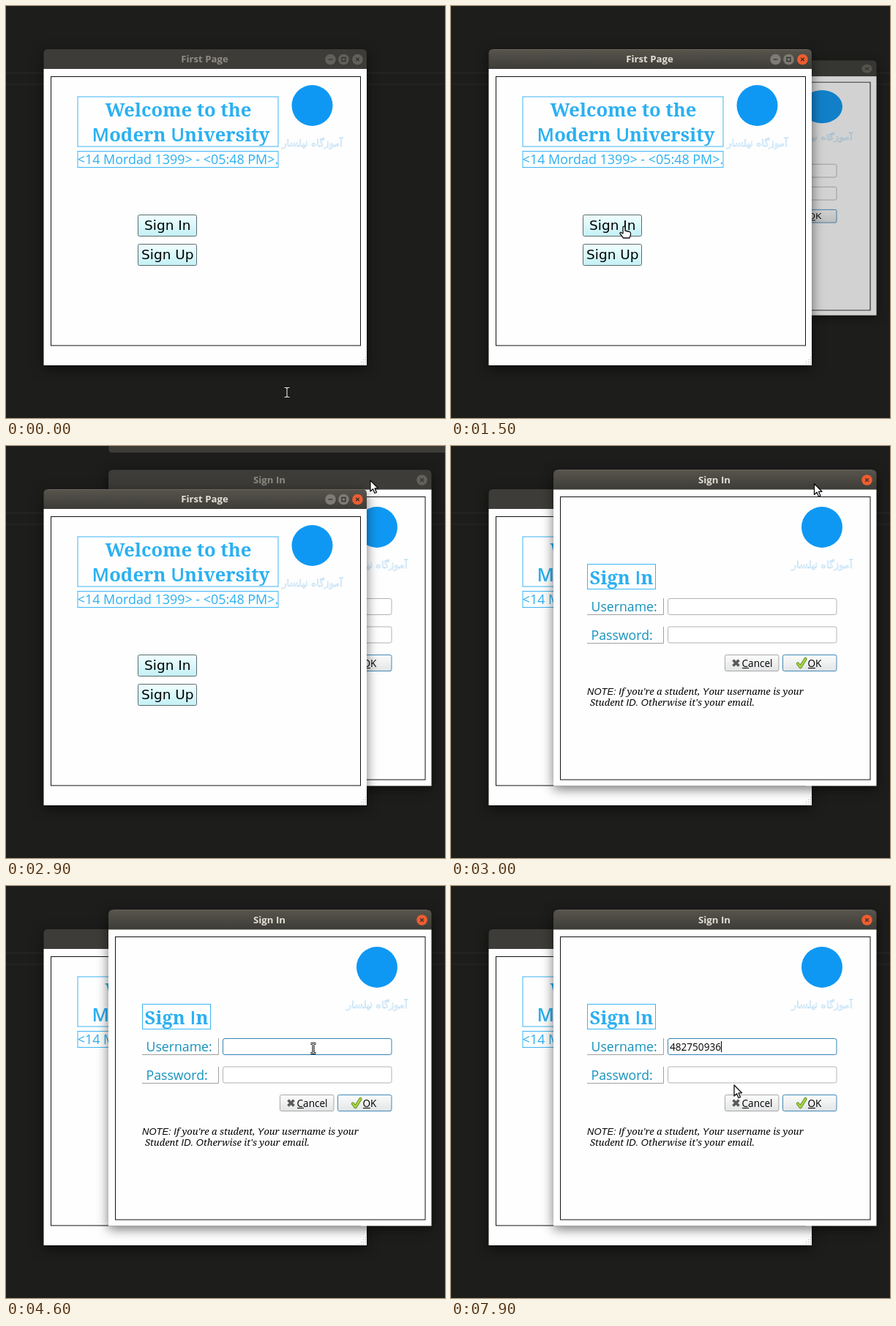
An HTML page that plays this animation: 600 px wide and 563 px high, repeating every 8 s.

```html
<!DOCTYPE html>
<html lang="en">
<head>
<meta charset="utf-8">
<title>Sign in demo</title>
<style>
  html, body { margin: 0; width: 100%; height: 100%; overflow: hidden; background: #1d1d1c; }
  svg { display: block; width: 600px; height: 563px; }
  text { white-space: pre; }
  .ui { font-family: "Open Sans", "Noto Sans", sans-serif; font-size: 13.6px; }
  .title { font: 700 13.2px "Open Sans", "Noto Sans", sans-serif; text-anchor: middle; }
  .head { font: 700 25.6px "Noto Serif", serif; fill: #2bb0f2; text-anchor: middle; }
  .head tspan { font: 600 25.5px "Open Sans", "Noto Sans", sans-serif; }
  .date { font: 17.9px "Open Sans", "Noto Sans", sans-serif; fill: #2bb0f2; text-anchor: middle; }
  .label { font: 17.7px "Open Sans", "Noto Sans", sans-serif; fill: #1592bd; }
  .big { font: 18.5px "DejaVu Sans", sans-serif; text-anchor: middle; }
  .note { font: italic 13px "Noto Serif", serif; }
  .note tspan { font: italic 13px "Liberation Sans", sans-serif; }
  .mark { font: 13.8px "DejaVu Sans", sans-serif; fill: none; stroke: #a5d2f2; stroke-width: .5; text-anchor: middle; direction: rtl; }
  .box { fill: none; stroke: #3db6f3; }
  .frame { fill: none; stroke: #111; }
  .win { filter: drop-shadow(0 4px 8px rgba(0, 0, 0, .55)); }
</style>
</head>
<body>
<svg id="stage" viewBox="0 0 600 563" xmlns="http://www.w3.org/2000/svg"></svg>
<script>
const LOOP = 8000, STEP = 100;
const OPEN = 1360, OPEN_TIME = 250, FOCUS_FIRST = 1200, RAISE = 3000, FOCUS_FIELD = 4200;
const USER = '482750936';
const KEY_TIMES = [5100, 5700, 5900, 6100, 6300, 6500, 6900, 7100, 7300];
const DIGIT = 7.79;

// Pointer hot spot: time, x, y
const PATH = [
  [0, 384, 528], [200, 395, 470], [300, 433, 330], [400, 420, 200], [500, 330, 142],
  [600, 230, 128], [700, 150, 150], [800, 127, 210], [900, 150, 270], [1000, 195, 297],
  [1200, 230, 301], [1500, 236, 302], [1800, 236, 303], [1900, 236, 320], [2000, 250, 290],
  [2100, 266.5, 245.5], [2300, 310, 180], [2500, 410, 100], [2700, 520, 50], [2900, 498, 47],
  [3100, 495, 56], [3500, 418, 203], [3700, 360, 240], [3800, 269, 246], [3900, 300, 238],
  [4100, 400, 224], [4200, 420, 222], [7500, 420, 222], [7700, 404, 252], [7800, 384, 283],
  [7900, 387, 272]
];

const rect = (x, y, w, h, attrs) => `<rect x="${x}" y="${y}" width="${w}" height="${h}" ${attrs}/>`;
const text = (x, y, cls, s, attrs = '') => `<text x="${x}" y="${y}" class="${cls}" ${attrs}>${s}</text>`;
const gradient = (id, from, to) =>
  `<linearGradient id="${id}" x2="0" y2="1"><stop stop-color="${from}"/><stop offset="1" stop-color="${to}"/></linearGradient>`;

const GLYPHS = { min: 'M-3 0H3', max: 'M-2.5 -2.5H2.5V2.5H-2.5Z', close: 'M-2.3 -2.3L2.3 2.3M2.3 -2.3L-2.3 2.3' };

function titleButton(x, y, kind, active) {
  const fill = !active ? '#62605a' : kind === 'close' ? '#ee5d31' : '#7d7b73';
  return `<g transform="translate(${x} ${y})"><circle r="7.3" fill="${fill}"/>
    <path d="${GLYPHS[kind]}" fill="none" stroke="#33322e" stroke-width="1.3"/></g>`;
}

function titleBar(x, y, name, buttons, active) {
  const shape = `M${x} ${y + 27}V${y + 6}q0 -6 6 -6h429.5q6 0 6 6v21Z`;
  return `<path d="${shape}" fill="${active ? 'url(#barOn)' : '#3d3c38'}"/>
    ${active ? `<path d="M${x + 6} ${y + .5}h429" stroke="#68665d"/>` : ''}
    ${text(x + 220, y + 18, 'title', name, `fill="${active ? '#e2dfd5' : '#8e8b83'}"`)}
    ${buttons.map(([dx, kind]) => titleButton(x + dx, y + 14, kind, active)).join('')}`;
}

function windowShell(id, x, y, name, buttons, body) {
  return `<g id="${id}" class="win">
    <g class="off">${titleBar(x, y, name, buttons, false)}</g>
    <g class="on">${titleBar(x, y, name, buttons, true)}</g>
    ${rect(x, y + 27, 441.5, 405, 'fill="#fefefe"')}${body}</g>`;
}

const emblem = (x, y) =>
  `<circle cx="${x}" cy="${y}" r="28" fill="#0f98f3"/>${text(x, y + 56, 'mark', 'آموزگاه نیلسار')}`;

function grip(x, y) {
  let dots = '';
  for (let r = 0; r < 4; r++)
    for (let c = 0; c <= r; c++) dots += rect(x - c * 3, y - (3 - r) * 3, 1, 1, 'fill="#aaa"');
  return dots;
}

const bigButton = (y, name) =>
  rect(180.5, y, 80, 29, 'rx="2" fill="url(#cyan)" stroke="#5c6b6d"') + text(220.8, y + 20.5, 'big', name);

const label = (y, name) =>
  `<path d="M186 ${y + 22.5}H290.5V${y}" fill="none" stroke="#a0a0a0"/>` + text(191.5, y + 18, 'label', name);

const field = (y, id) =>
  rect(296.5, y, 230.5, 22, `id="${id}" rx="2.5" fill="#fff" stroke="#b2b2b2"`);

const dialogButton = (x, edge, tx, name) =>
  rect(x, 285.5, 73.5, 22, `rx="2" fill="url(#grey)" stroke="${edge}"`) + text(tx, 301.5, 'ui', name);

const firstBody = `
  ${rect(61.5, 96.5, 423, 367.5, 'class="frame"')}
  ${rect(98, 124, 274, 68, 'class="box"')}
  ${rect(98, 198.5, 274, 22, 'class="box"')}
  ${text(235.5, 151, 'head', 'Welcome to the')}
  ${text(239, 185, 'head', '<tspan>M</tspan>odern <tspan>U</tspan>niversity')}
  ${text(235, 216, 'date', '&lt;14 Mordad 1399&gt; - &lt;05:48 PM&gt;.')}
  ${emblem(418.5, 136)}
  ${bigButton(285.5, 'Sign In')}${bigButton(325.5, 'Sign Up')}
  ${grip(491, 489)}`;

const signBody = `
  ${rect(149.5, 69.5, 423.5, 386.5, 'class="frame"')}
  ${emblem(507, 111)}
  ${rect(186.5, 161.5, 93, 34, 'class="box"')}
  ${text(233, 188.5, 'head', 'Sign <tspan>I</tspan>n')}
  ${label(208, 'Username:')}${label(247, 'Password:')}
  ${field(208.5, 'userField')}${field(247, 'passField')}
  ${text(299, 224.5, 'ui', '', 'id="user"')}
  <path id="caret" d="M0 212V227" stroke="#000"/>
  ${dialogButton(374.5, '#a8a8a8', 397.5, 'Cancel')}
  ${dialogButton(453.5, '#4089b8', 487.5, 'OK')}
  <path d="M398 303.5h9M488 303.5h10" stroke="#000"/>
  <path d="M385.5 292.5l8 8m0 -8l-8 8" stroke="#5b5a56" stroke-width="3.6"/>
  <g fill="none" stroke-linejoin="round" stroke-linecap="round">
    <path d="M474 297.5l3.5 4.5 7 -11" stroke="#5d8a1d" stroke-width="4.2"/>
    <path d="M474 297.5l3.5 4.5 7 -11" stroke="#a8d641" stroke-width="2.5"/>
  </g>
  ${text(186, 339.5, 'note', '<tspan>NOTE: I</tspan>f you\'re a student, <tspan>Y</tspan>our username is your')}
  ${text(190, 355, 'note', 'Student <tspan>ID. O</tspan>therwise it\'s your email.')}`;

const beam = 'M-3.5 -6.5H-1L0 -5.5 1 -6.5H3.5M0 -5.5V5.5M-3.5 6.5H-1L0 5.5 1 6.5H3.5';
const pointers = `
  <path id="arrow" d="M0 0V15L3.5 11.8 6 17.5 8.5 16.4 6 10.8H10.5Z" fill="#fff" stroke="#111" stroke-width="1.3" stroke-linejoin="round"/>
  <g id="beam" fill="none"><path d="${beam}" stroke="#111" stroke-width="3.2"/><path d="${beam}" stroke="#f4f4f4" stroke-width="1.1"/></g>
  <path id="hand" d="M-1 0q1.5 -1.5 3 0V5l6 1.5q1.5 .5 1.5 2V11l-1.5 4H-.5L-5 9q-.5 -2 1.5 -1.5L-1 9Z" fill="#fff" stroke="#111" stroke-width="1.3" stroke-linejoin="round"/>`;

const stage = document.getElementById('stage');
stage.innerHTML = `
  <defs>${gradient('barOn', '#57554c', '#3d3c37')}${gradient('cyan', '#f0ffff', '#c3f0f5')}${gradient('grey', '#fcfcfc', '#e2e4e5')}</defs>
  ${rect(0, 0, 600, 563, 'fill="#1d1d1c"')}
  <path d="M0 91.5H600M0 107H600" stroke="#2a2a29"/>
  ${rect(140.5, -20, 480, 29, 'id="notice" rx="4" fill="#3d3c37"')}
  <g id="desk">
    ${windowShell('sign', 140, 32.5, 'Sign In', [[428.5, 'close']], signBody)}
    ${windowShell('first', 51.5, 59, 'First Page', [[392, 'min'], [410, 'max'], [429, 'close']], firstBody)}
  </g>
  <g id="pointer">${pointers}</g>`;

const el = {};
stage.querySelectorAll('[id]').forEach(n => el[n.id] = n);

const show = (node, on) => node.setAttribute('visibility', on ? 'visible' : 'hidden');

function setActive(win, on) {
  win.querySelector('.on').style.display = on ? '' : 'none';
  win.querySelector('.off').style.display = on ? 'none' : '';
}

function pointerAt(t) {
  const i = PATH.findIndex(p => p[0] > t);
  if (i < 0) return PATH[PATH.length - 1].slice(1);
  const [t0, x0, y0] = PATH[i - 1], [t1, x1, y1] = PATH[i];
  const k = (t - t0) / (t1 - t0);
  return [x0 + (x1 - x0) * k, y0 + (y1 - y0) * k];
}

function pointerKind(t, x, y) {
  const inside = (l, top, r, b) => x >= l && x <= r && y >= top && y <= b;
  if (t < RAISE) {
    if (inside(180, 285, 262, 315) || inside(180, 325, 262, 355)) return 'hand';
    return y > 491 ? 'beam' : 'arrow';
  }
  return inside(296, 208, 528, 231) || inside(296, 247, 528, 270) ? 'beam' : 'arrow';
}

function draw(time) {
  const t = Math.floor(time / STEP) * STEP;
  const raised = t >= RAISE;
  const top = raised ? el.sign : el.first;
  if (el.desk.lastElementChild !== top) el.desk.appendChild(top);

  setActive(el.first, t >= FOCUS_FIRST && !raised);
  setActive(el.sign, raised);
  show(el.notice, t >= 1800 && !raised);

  // The dialog unfolds vertically about its middle
  const p = Math.min(1, Math.max(0, (t - OPEN) / OPEN_TIME));
  const grow = 1 - (1 - p) ** 2;
  el.sign.style.display = grow > 0 ? '' : 'none';
  el.sign.style.opacity = grow;
  el.sign.setAttribute('transform', `translate(0 ${248.5 * (1 - grow)}) scale(1 ${grow})`);

  const focused = t >= FOCUS_FIELD;
  const typed = KEY_TIMES.filter(k => k <= t).length;
  el.userField.setAttribute('stroke', focused ? '#3584b5' : '#b2b2b2');
  el.user.textContent = USER.slice(0, typed);
  el.caret.setAttribute('transform', `translate(${Math.round(299 + typed * DIGIT) + .5} 0)`);
  el.caret.style.display = focused && (t < 4600 || t >= KEY_TIMES[0]) ? '' : 'none';

  const [x, y] = pointerAt(t);
  const kind = pointerKind(t, x, y);
  el.pointer.setAttribute('transform', `translate(${x} ${y})`);
  for (const k of ['arrow', 'beam', 'hand']) show(el[k], k === kind);
}

const start = performance.now();
function tick() {
  draw((performance.now() - start) % LOOP);
  requestAnimationFrame(tick);
}
tick();
</script>
</body>
</html>
```
